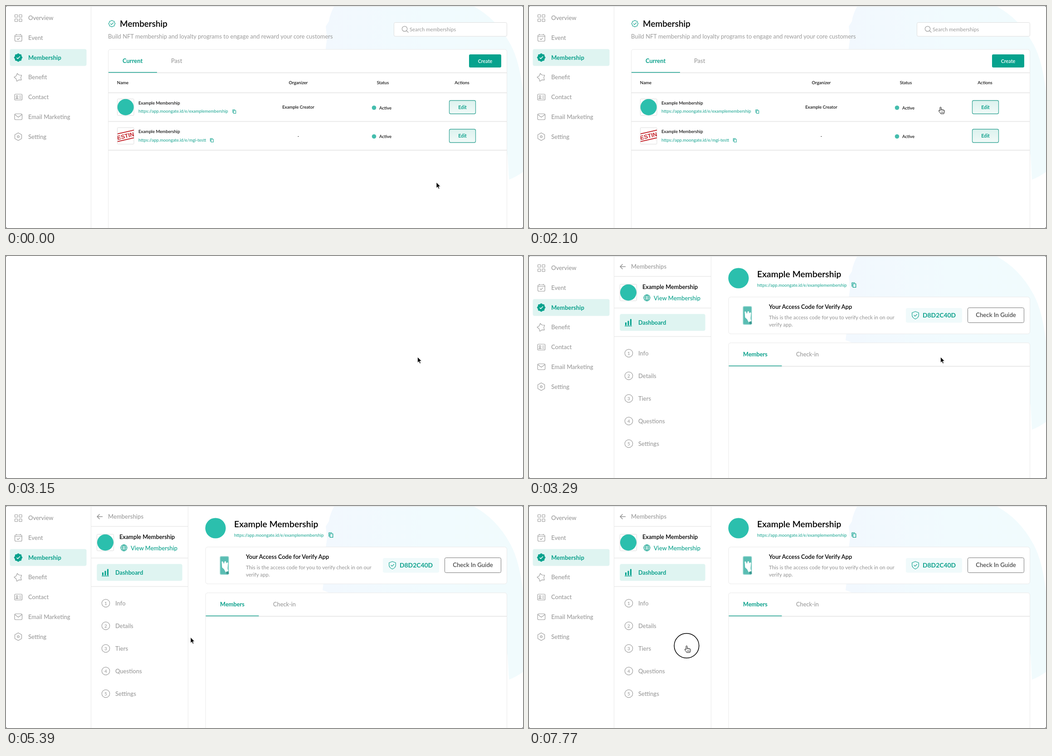
Write an HTML page that moves like this. It is 1140x491 px and loops after 8 s.

```html
<!DOCTYPE html>
<html lang="en">
<head>
<meta charset="utf-8">
<title>Membership dashboard</title>
<style>
html, body { margin: 0; width: 100%; height: 100%; overflow: hidden; background: #fff; }
svg { display: block; width: 1140px; height: 491px; font-family: Lato, sans-serif; }
text { fill: #000; white-space: pre; }
.med { font-weight: 500; }
.bold { font-weight: 600; }
.bold.teal { font-weight: 700; }
.gray { fill: #9a9a9a; }
.teal { fill: #0aa08b; }
.link { fill: #26aa97; font-weight: 500; }
.mid { text-anchor: middle; }
.icon { fill: none; stroke: #a0a0a0; stroke-width: 1.2; stroke-linecap: round; stroke-linejoin: round; }
.icon.green { stroke: #19a592; }
.card { fill: #fff; stroke: #e9e9e9; }
.tint { fill: #dff4f1; }
</style>
</head>
<body>
<svg id="stage" viewBox="0 0 1140 491"></svg>
<script>
const LOOP = 8000, STEP = 70;
const ACCENT = '#06a28d';

const text = (x, y, size, cls, str) => `<text x="${x}" y="${y}" font-size="${size}" class="${cls}">${str}</text>`;
const icon = (d, cls = '') => `<path class="icon ${cls}" d="${d}"/>`;
const rect = (x, y, w, h, attrs) => `<rect x="${x}" y="${y}" width="${w}" height="${h}" ${attrs}/>`;
const circle = (x, y, r, attrs) => `<circle cx="${x}" cy="${y}" r="${r}" ${attrs}/>`;
const rule = (x, y, w) => rect(x, y, w, 1.8, 'fill="#e8e8e8"');
const underline = (x, y, w) => rect(x, y, w, 1.5, 'fill="#1fa593"');

// Closed outline alternating between two radii
function star(cx, cy, points, outer, inner) {
  const corners = Array.from({ length: points * 2 }, (_, i) => {
    const a = Math.PI * i / points - Math.PI / 2, r = i % 2 ? inner : outer;
    return (cx + r * Math.cos(a)).toFixed(2) + ' ' + (cy + r * Math.sin(a)).toFixed(2);
  });
  return 'M' + corners.join('L') + 'Z';
}

const copyIcon = (x, y, s) => `<g transform="translate(${x} ${y}) scale(${s})">
  ${icon('M2.5 2.5H8V9.5H2.5ZM.5 7.5V.5H6', 'green')}</g>`;

function sidebar() {
  const items = ['Overview', 'Event', 'Membership', 'Benefit', 'Contact', 'Email Marketing', 'Setting'];
  const labels = items.map((name, i) =>
    text(49, 31 + i * 43.75, 13, i === 2 ? 'bold teal' : 'med gray', name)).join('');
  const tiles = [[19.5, 19], [29, 19], [19.5, 28.5], [29, 28.5]]
    .map(([x, y]) => rect(x, y, 6, 6, 'rx="1" class="icon"')).join('');
  return rect(187, 1, 1, 490, 'fill="#e9e9e9"') +
    rect(8.4, 95.2, 169.2, 37.4, 'rx="4" class="tint"') + labels + tiles +
    rect(19.5, 64, 15.5, 14, 'rx="2.5" class="icon"') +
    icon('M23 62V64M31.5 62V64M19.5 67.5H35M24.5 72.5L26.5 74.5L30 71') +
    `<path d="${star(27, 114, 8, 8.4, 7)}" fill="${ACCENT}" stroke="${ACCENT}" stroke-width="2" stroke-linejoin="round"/>
     <path d="M23.5 114.2L26 116.6L30.8 111.6" fill="none" stroke="#fff" stroke-width="1.5"/>` +
    `<g transform="rotate(-15 27 158)">${icon(star(27, 158, 5, 9, 5.6))}</g>` +
    rect(19, 195, 16.5, 13, 'rx="2" class="icon"') +
    icon('M21.5 205Q24.2 201.8 27 205ZM29.5 199H33M29.5 202H33M29.5 205H33') +
    circle(24.2, 200, 1.8, 'class="icon"') +
    rect(19, 238.5, 16.5, 13, 'rx="2.5" class="icon"') + icon('M20 240.5L27.2 246L34.5 240.5') +
    icon('M27 280.5L34.5 284.8V293.2L27 297.5L19.5 293.2V284.8Z') + circle(27, 289, 2.2, 'class="icon"');
}

function membershipRow(y, url, copyX, organizer, picture) {
  return rect(245.5, y + 13.5, 36.5, 36.5, 'rx="2" fill="#fff" stroke="#dcdcdc"') + picture +
    text(292, y + 25.5, 9.65, 'med', 'Example Membership') +
    text(292, y + 44, 9.45, 'link', url) + copyIcon(copyX, y + 37, .9) +
    text(644.5, y + 35, 9.65, 'med mid', organizer) +
    circle(811.5, y + 33, 4.8, 'fill="#45bdad"') + text(823, y + 36.5, 9.65, 'med', 'Active') +
    rect(977.5, y + 17, 58, 29.5, 'rx="3" fill="url(#button)" stroke="#3fa99b" stroke-width="1.3"') +
    text(1006.5, y + 35.7, 10.6, 'bold teal mid', 'Edit') + rule(226, y + 62.5, 878);
}

function listPage() {
  const stamp = `<g clip-path="url(#thumb)"><g transform="rotate(-13 263.5 287)" fill="#c4252c">
    <text x="263.5" y="292" class="mid" style="font:bold 13px 'Liberation Sans',sans-serif;fill:#c4252c">ESTIN</text>
    ${rect(238, 278, 52, 2, '')}${rect(238, 294.5, 52, 2, '')}</g></g>`;
  const columns = [['Name', 257.5], ['Organizer', 644.5], ['Status', 831], ['Actions', 1005.5]];
  return icon(star(233.5, 39, 8, 7.3, 6.2), 'green') + icon('M230.5 39.2L232.7 41.2L236.6 37', 'green') +
    text(251, 46, 18.9, 'bold', 'Membership') +
    text(225, 72, 12.95, 'gray', 'Build NFT membership and loyalty programs to engage and reward your core customers') +
    rect(855.5, 36.5, 249, 30.5, 'rx="3" fill="#fff" stroke="#dedede"') +
    circle(879, 50.5, 5.7, 'class="icon"') + icon('M883.2 54.7L887 58.3') +
    text(890, 55.5, 11.3, 'gray', 'Search memberships') +
    rect(225.5, 96, 879, 410, 'rx="5" class="card"') +
    text(257, 126, 13, 'bold teal', 'Current') + text(364, 126, 12.9, 'med gray', 'Past') +
    rect(1021, 107, 71, 29, `rx="3" fill="${ACCENT}"`) +
    `<text x="1056.5" y="125.7" font-size="10.8" class="bold mid" style="fill:#fff">Create</text>` +
    rule(226, 146.7, 878) + underline(226, 146, 107) +
    columns.map(([name, x]) => text(x, 173, 9.7, 'med mid', name)).join('') + rule(226, 191, 878) +
    membershipRow(192, 'https://app.moongate.id/e/examplemembership', 499.5, 'Example Creator',
      circle(263.7, 223.7, 18, 'fill="#2bbfad"')) +
    membershipRow(255.5, 'https://app.moongate.id/e/mgi-testt', 450, '-', stamp);
}

function detailPage() {
  const steps = ['Info', 'Details', 'Tiers', 'Questions', 'Settings'].map((name, i) => {
    const y = 215 + i * 50;
    return circle(220, y, 8.7, 'class="icon"') + text(220, y + 3.6, 10, 'med gray mid', i + 1) +
      text(241, y + 4.7, 13, 'med gray', name);
  }).join('');
  const phone = rect(471.5, 111, 20, 41, 'rx="3" fill="#8fd3cc"') +
    rect(473, 112.5, 17, 38, 'rx="2" fill="#5abdb3"') +
    `<path d="M475.5 123.5Q477 121.5 478.5 123.5L480.5 128L482 123Q484 121 485 123.5L485.5 127L488 124.5Q490 125 489.5 128L488.5 138L490.5 146L485 148L481 140L476.5 136Z" fill="#fff"/>
     <path d="M484.5 146L490.5 144L491.5 150L487 151Z" fill="#3a9991"/>`;
  return rect(401, 1, 1, 490, 'fill="#e9e9e9"') +
    `<path d="M213 23.5H201M206.5 18L201 23.5L206.5 29" fill="none" stroke="#909090" stroke-width="1.4"/>` +
    text(225, 28, 13.1, 'med gray', 'Memberships') +
    [45, 115, 178].map(y => rect(188, y - .5, 213, 1.2, 'fill="#e6e6e6"')).join('') +
    rect(200.5, 62.5, 37, 36.5, 'rx="2" fill="#fff" stroke="#dcdcdc"') + circle(219, 80.7, 18, 'fill="#2bbfad"') +
    text(250, 73, 12.8, 'bold', 'Example Membership') +
    circle(260, 92.5, 6.8, 'class="icon green"') +
    icon('M253.2 92.5H266.8M254.3 89H265.7M254.3 96H265.7M260 85.7Q253.5 92.5 260 99.3Q266.5 92.5 260 85.7', 'green') +
    text(275, 97.5, 12.9, 'med teal', 'View Membership') +
    rect(200.3, 128.2, 188.4, 37.4, 'rx="4" class="tint"') +
    rect(212, 147, 3, 6.5, `fill="${ACCENT}"`) + rect(217.5, 143.5, 3, 10, `fill="${ACCENT}"`) +
    rect(223, 139.5, 3, 14, `fill="${ACCENT}"`) + rect(211, 154.3, 16, 1.2, `fill="${ACCENT}"`) +
    text(241, 151.5, 12.7, 'bold teal', 'Dashboard') + steps +
    circle(462, 49, 22.6, 'fill="#2bbfad"') +
    text(503, 46.5, 19.4, 'bold', 'Example Membership') +
    text(503, 67.5, 9.45, 'link', 'https://app.moongate.id/e/examplemembership') + copyIcon(711.5, 58.5, 1.15) +
    rect(440, 90.7, 664.5, 81.5, 'rx="5" class="card"') + phone +
    text(529, 117, 12.95, 'bold', 'Your Access Code for Verify App') +
    text(529, 140, 11.45, 'med gray', 'This is the access code for you to verify check in on our') +
    text(529, 156, 11.45, 'med gray', 'verify app.') +
    rect(831, 115, 124, 32.5, 'rx="4" fill="#f0fafb"') +
    icon('M852 122.8L859.3 125.5V131Q859 136.5 852 139.5Q845 136.5 844.7 131V125.5ZM849 131L851.3 133.2L855.3 129', 'green') +
    text(868, 136.3, 13.9, 'bold teal', 'D8D2C40D') +
    rect(967.5, 114.5, 124, 33, 'rx="3" fill="#fff" stroke="#777"') +
    `<text x="1029.5" y="135.3" font-size="13.2" class="bold mid" style="fill:#4c4c4c">Check In Guide</text>` +
    rect(440, 192, 664.5, 320, 'rx="5" class="card"') +
    text(472, 222, 12.8, 'bold teal', 'Members') + text(589, 222, 12.8, 'med gray', 'Check-in') +
    rule(440.5, 243, 664) + underline(440.5, 242.3, 117);
}

const stage = document.getElementById('stage');
stage.innerHTML = `
<defs>
  <linearGradient id="wash"><stop stop-color="#f2f8fe"/><stop offset=".55" stop-color="#f1fbfe"/><stop offset="1" stop-color="#f1fbfd"/></linearGradient>
  <linearGradient id="button" x2="0" y2="1"><stop stop-color="#dcf2ee"/><stop offset="1" stop-color="#f1faf8"/></linearGradient>
  <clipPath id="thumb">${rect(246, 269, 36, 36, '')}</clipPath>
</defs>
${rect(0, 0, 1140, 491, 'fill="#fff"')}
<g id="app">
  <path d="M724 0Q714 18 712 34L705 45L708 72Q702 105 704 140L698 186Q800 230 1090 260L1106 330L1109 384Q1125 378 1140 367V190Q1132 120 1112 84Q1082 28 1030 0Z" fill="url(#wash)"/>
  ${rect(0, 0, 1140, 1.5, 'fill="#e3e5e6"')}
  ${sidebar()}
  <g id="list">${listPage()}</g>
  <g id="detail">${detailPage()}</g>
</g>
<path d="M0 0H3Q0 0 0 3ZM1140 0V3Q1140 0 1137 0ZM0 491V488Q0 491 3 491ZM1140 491H1137Q1140 491 1140 488Z" fill="#333"/>
<g id="cursor">
  <circle id="ring" r="27.3" fill="none" stroke="#000" stroke-width="1.5"/>
  <path id="arrow" d="M0 0V12.6L2.9 9.9L4.9 14.5L7 13.6L5 9.2H8.9Z" stroke="#fff" stroke-width=".8"/>
  <g id="hand" fill="#fff" stroke="#000" stroke-linejoin="round">
    <path d="M-1.3 8.5V1.4Q-1.2 .2 0 .2T1.4 1.4V5.6Q2.8 4.8 3.8 6.2Q5.4 5.3 6.3 6.8Q8.5 6.6 8.6 8.6V11Q8.2 13 7.2 15H.4Q-1 12.3-4 9.2Q-4.3 7.2-2.4 7.6Z"/>
    <path d="M1.4 5.6V8M3.8 6.2V8.2M6.3 6.8V8.5M2 10.5V13M4 10.5V13M6 10.5V13" stroke-width=".8"/>
  </g>
</g>`;

// Pointer stops: time, x, y
const stops = [
  [0, 949, 390], [840, 949, 390], [1640, 908.5, 227], [1820, 908, 224.5], [1890, 908, 224.5],
  [2100, 907.5, 223.3], [4480, 907.5, 223.5], [4550, 904, 224], [5320, 421, 286], [5390, 407, 290.5],
  [5530, 394, 297], [5600, 394, 297], [6160, 348, 308.5], [6230, 348, 308.5], [6370, 347.5, 309], [LOOP, 347.5, 309],
];

function pointerAt(t) {
  const i = stops.findIndex(stop => stop[0] > t);
  const [t0, x0, y0] = stops[i - 1], [t1, x1, y1] = stops[i];
  const u = (t - t0) / (t1 - t0), k = u * u * (3 - 2 * u);
  return [x0 + (x1 - x0) * k, y0 + (y1 - y0) * k];
}

const parts = Object.fromEntries(['app', 'list', 'detail', 'cursor', 'ring', 'arrow', 'hand']
  .map(id => [id, document.getElementById(id)]));
const show = (id, on) => parts[id].setAttribute('display', on ? 'inline' : 'none');

function draw() {
  const t = Math.floor((performance.now() % LOOP) / STEP) * STEP;
  const [x, y] = pointerAt(t);
  const onList = t < 3080, onDetail = t >= 3290;
  const pointing = onList ? y < 319 : onDetail && x < 389;
  show('app', onList || onDetail);
  show('list', onList);
  show('detail', onDetail);
  show('hand', pointing);
  show('arrow', !pointing);
  show('ring', (t >= 2800 && onList) || t >= 7770);
  parts.cursor.setAttribute('transform', `translate(${x.toFixed(1)} ${y.toFixed(1)})`);
  requestAnimationFrame(draw);
}
draw();
</script>
</body>
</html>
```
